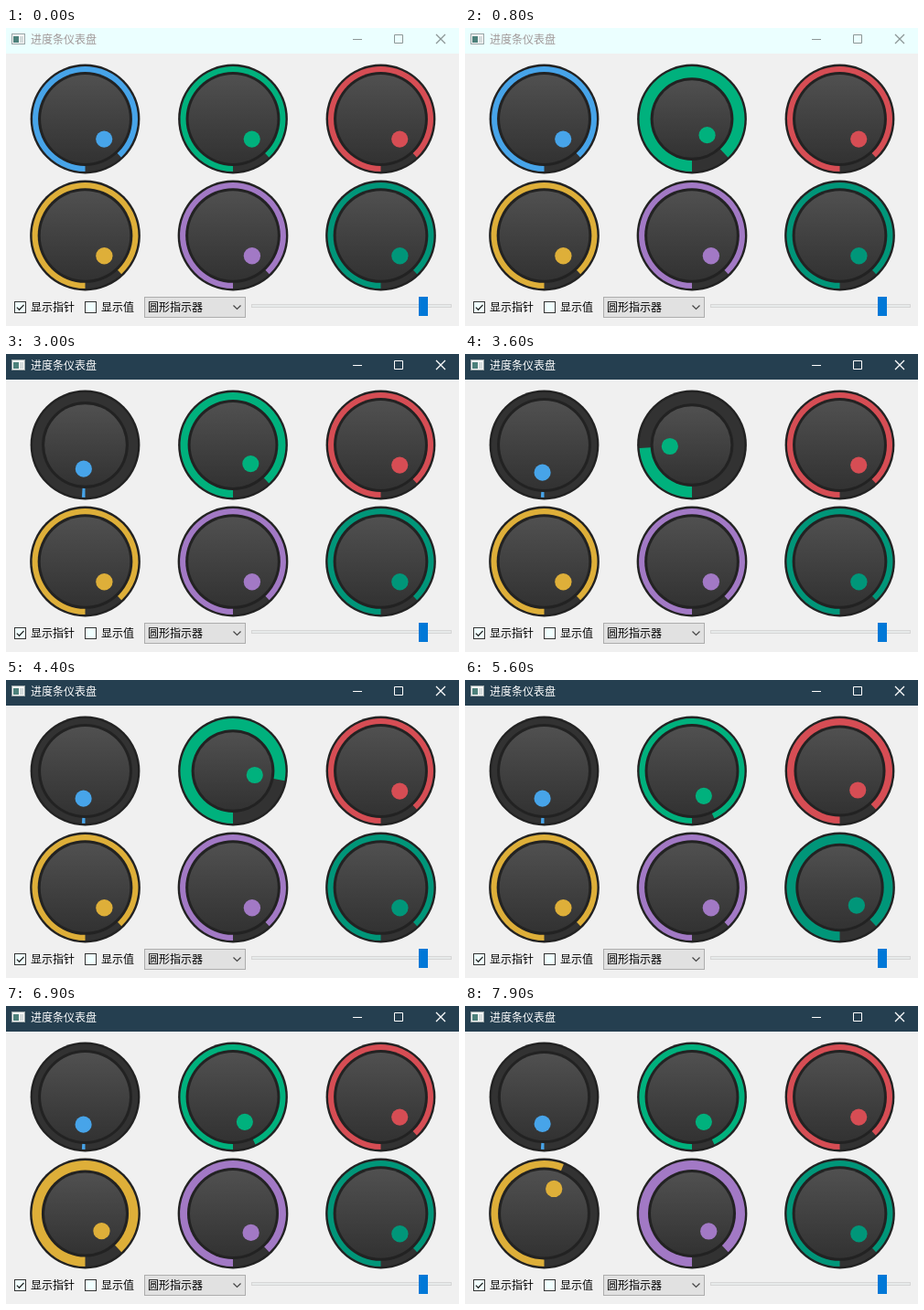
An HTML page that plays this animation: 495x326 px, repeating every 8 s.

```html
<!DOCTYPE html>
<html lang="zh-CN">
<head>
<meta charset="utf-8">
<title>进度条仪表盘</title>
<style>
html, body { margin: 0; width: 100%; height: 100%; overflow: hidden; background: #f0f0f0; }
svg { display: block; }
text { font: 12px "Noto Sans CJK SC", "Noto Sans CJK", sans-serif; }
</style>
</head>
<body>
<svg width="495" height="326" viewBox="0 0 495 326">
  <defs>
    <linearGradient id="face" x1="0" y1="0" x2="0" y2="1">
      <stop offset="0" stop-color="#505050"/>
      <stop offset="1" stop-color="#323232"/>
    </linearGradient>
  </defs>
  <rect width="495" height="326" fill="#f0f0f0"/>
  <rect id="bar" width="495" height="28"/>
  <g>
    <rect x="6.5" y="6.5" width="14" height="11" fill="#f8f8f8" stroke="#98a4a6"/>
    <rect x="8" y="9" width="6" height="7" fill="#4d817b"/>
    <rect x="15" y="9" width="4" height="7" fill="#d5dcdd"/>
  </g>
  <text id="title" x="27" y="17">进度条仪表盘</text>
  <g id="buttons" fill="none">
    <path d="M379 12.5h10M424.5 7.5h9v9h-9z"/>
    <path d="M470 7l10 10M480 7l-10 10" stroke-width="1.3"/>
  </g>
  <g id="gauges"></g>
  <g fill="#f0ffff" stroke="#333">
    <rect x="9.5" y="299.5" width="12" height="12"/>
    <rect x="86.5" y="299.5" width="12" height="12"/>
  </g>
  <path d="M11.8 305.6l2.7 2.7 5-5.4" fill="none" stroke="#222" stroke-width="1.3"/>
  <rect x="151.5" y="294.5" width="110" height="22" fill="#e1e1e1" stroke="#adadad"/>
  <path d="M248.5 303.5l4 4 4-4" fill="none" stroke="#444" stroke-width="1.2"/>
  <g fill="#000">
    <text x="27" y="310">显示指针</text>
    <text x="104" y="310">显示值</text>
    <text x="155" y="310">圆形指示器</text>
  </g>
  <rect x="268.5" y="302.5" width="218" height="3" fill="#e7eaea" stroke="#d6d6d6"/>
  <rect x="451" y="294" width="10" height="21" fill="#0078d7"/>
</svg>
<script>
const LOOP = 8000, STEP = 100, FADE = 300, ACTIVATE = 1500;
// Dial sizes on a face 200 units wide
const RIM = 95, EDGE = 85, FACE = 80, REACH = 50, GROWTH = 10;
const $ = id => document.getElementById(id);
const clamp = v => Math.max(0, Math.min(1, v));

function set(el, attrs) {
  for (const key in attrs) el.setAttribute(key, attrs[key]);
  return el;
}

function add(parent, tag, attrs) {
  const el = document.createElementNS('http://www.w3.org/2000/svg', tag);
  return parent.appendChild(set(el, attrs));
}

function makeGauge(color, i) {
  const lower = i > 2;
  const x = 86.5 + i % 3 * 161.5, y = lower ? 227 : 99.5;
  const scale = lower ? 0.61 : 0.605;
  const box = add($('gauges'), 'g', { transform: `translate(${x} ${y}) scale(${scale})` });
  add(box, 'circle', { r: 99, fill: '#222' });
  add(box, 'circle', { r: RIM, fill: '#323232' });
  return {
    arc: add(box, 'path', { fill: color }),
    edge: add(box, 'circle', { fill: '#222' }),
    face: add(box, 'circle', { fill: 'url(#face)' }),
    dot: add(box, 'circle', { r: 15, fill: color })
  };
}

const gauges = ['#47a4e9', '#00b17d', '#d64d54', '#deaf39', '#a279c5', '#009679'].map(makeGauge);
const [blue, green, red, yellow, purple, teal] = gauges;

// When the mouse enters each gauge; null is the space between
const path = [
  [100, red], [500, green], [800, blue], [2900, green], [4800, red], [5370, null],
  [5420, teal], [6100, purple], [6690, yellow], [7670, blue], [7710, purple]
];

const drags = [
  { gauge: blue, start: 1400, end: 1600, from: 88, to: 84 },
  { gauge: blue, start: 1700, end: 2800, from: 84, to: 1 },
  { gauge: green, start: 3400, end: 3800, from: 4, to: 36 },
  { gauge: green, start: 3900, end: 4700, from: 36, to: 93 },
  { gauge: yellow, start: 7100, end: 7500, from: 88, to: 3 },
  { gauge: yellow, start: 7500, end: 7700, from: 3, to: 56 }
];

function hoverAt(gauge, t) {
  let hover = 0;
  path.forEach(([enter, over], i) => {
    if (over !== gauge) return;
    const leave = i + 1 < path.length ? path[i + 1][0] : LOOP;
    hover += clamp((t - enter) / FADE) - clamp((t - leave) / FADE);
  });
  return hover;
}

function valueAt(gauge, t) {
  const drag = drags.filter(d => d.gauge === gauge && d.start <= t).pop();
  if (!drag) return 88;
  const part = clamp((t - drag.start) / (drag.end - drag.start)) ** 0.65;
  return Math.round(drag.from + (drag.to - drag.from) * part);
}

// Angles run clockwise from the bottom
function drawGauge(g, t) {
  const value = valueAt(g, t);
  const shrink = hoverAt(g, t) * GROWTH;
  const angle = value / 100 * 2 * Math.PI;
  const dx = -Math.sin(angle), dy = Math.cos(angle);
  const reach = REACH - shrink;
  set(g.arc, { d: `M0 0V${RIM}A${RIM} ${RIM} 0 ${value > 50 ? 1 : 0} 1 ${dx * RIM} ${dy * RIM}Z` });
  set(g.edge, { r: EDGE - shrink });
  set(g.face, { r: FACE - shrink });
  set(g.dot, { cx: dx * reach, cy: dy * reach });
}

function draw(now) {
  const t = Math.floor(now % LOOP / STEP) * STEP;
  const active = t >= ACTIVATE;
  set($('bar'), { fill: active ? '#253f50' : '#ebffff' });
  set($('title'), { fill: active ? '#fff' : '#a09898' });
  set($('buttons'), { stroke: active ? '#fff' : '#8c9696' });
  for (const g of gauges) drawGauge(g, t);
}

const begin = performance.now();
function tick() {
  draw(performance.now() - begin);
  requestAnimationFrame(tick);
}
tick();
</script>
</body>
</html>
```
